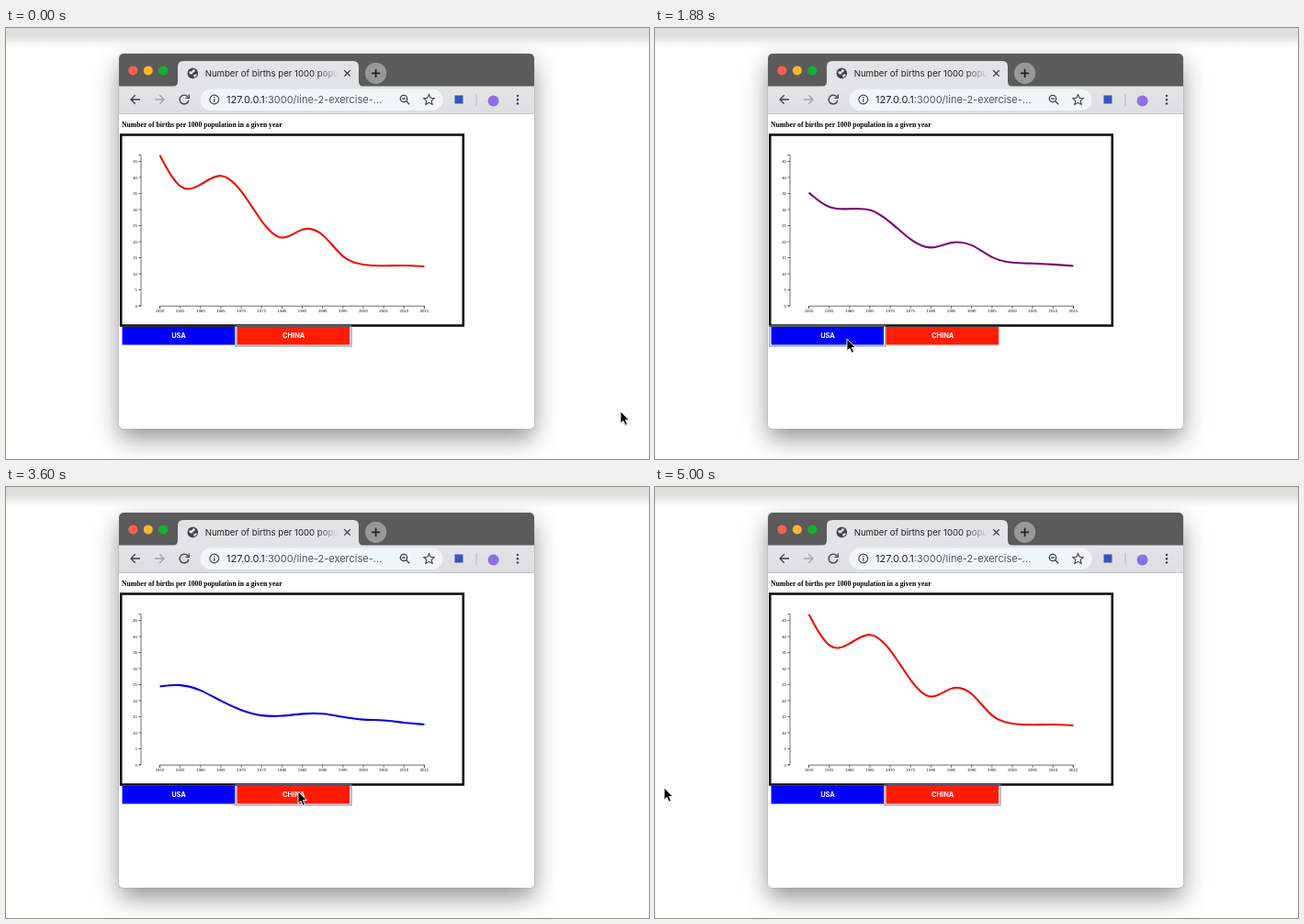
Animation, 700 px wide and 470 px high, one loop 5.04 s. Source, as an HTML page:

```html
<!DOCTYPE html>
<html lang="en">
<head>
<meta charset="utf-8">
<title>Births line chart</title>
<style>
  html, body { margin: 0; width: 100%; height: 100%; overflow: hidden; background: #fff; }
  #stage { position: relative; width: 700px; height: 470px; overflow: hidden;
    background: linear-gradient(#dcdcdc 0, #e0e0e0 9px, #f6f6f6 17px, #fff 23px) #fff; }
  #shadow { position: absolute; left: 123px; top: 28px; width: 452px; height: 409px; border-radius: 5px;
    box-shadow: 0 11px 27px rgba(0,0,0,.42), 0 0 1px rgba(0,0,0,.5); }
  svg { position: absolute; left: 0; top: 0; }
  text { white-space: pre; }
  .ui { font-family: Inter, Roboto, sans-serif; }
  .serif { font: bold 7.7px "Liberation Serif", "Times New Roman", serif; }
  .axis { font: 4.3px "Liberation Sans", Arial, sans-serif; fill: #111; }
  .axis path { fill: none; stroke: #333; stroke-width: .7; }
  .icon { fill: none; stroke: #3c4043; stroke-width: 1.3; }
  .label { font-size: 7.4px; font-weight: 700; fill: #fff; text-anchor: middle; }
</style>
</head>
<body>
<div id="stage">
  <div id="shadow"></div>
  <svg width="700" height="470" viewBox="0 0 700 470">
    <defs>
      <clipPath id="frame"><rect x="123" y="28" width="452" height="409" rx="5"/></clipPath>
      <linearGradient id="bar" x2="0" y2="1"><stop stop-color="#e3e4e5"/><stop offset="1" stop-color="#dddee0"/></linearGradient>
      <linearGradient id="fade"><stop stop-color="#e2e3e4" stop-opacity="0"/><stop offset="1" stop-color="#e2e3e4"/></linearGradient>
    </defs>

    <g clip-path="url(#frame)">
      <rect x="123" y="28" width="452" height="409" fill="#fff"/>
      <rect x="123" y="28" width="452" height="36" fill="#5b5b5b"/>
      <rect x="123" y="63.5" width="452" height="30" fill="url(#bar)"/>
      <rect x="123" y="93" width="452" height="1" fill="#c4c5c7"/>
    </g>

    <circle cx="138.3" cy="46.4" r="5" fill="#ff5f4e"/>
    <circle cx="154.8" cy="46.4" r="5" fill="#fdb62c"/>
    <circle cx="171.2" cy="46.4" r="5" fill="#12b233"/>

    <path d="M181 64Q187 64 187 58V42Q187 36 193 36H378Q384 36 384 42V58Q384 64 390 64Z" fill="#e2e3e4"/>
    <circle cx="203.3" cy="49.4" r="5.8" fill="#3f4347"/>
    <path d="M199 47.5l3.5-.2 1.2-2.4 2.2.8-.6 2.2-2.2 1.2.2 1.5-3.1-.3zM204 51.5l3.3-1.4.3 1.6-2.8 2.5z" fill="#e2e3e4"/>
    <text class="ui" x="216.7" y="53" font-size="9.6" fill="#222">Number of births per 1000 popu</text>
    <rect x="338" y="42" width="24" height="15" fill="url(#fade)"/>
    <path d="M368.3 46.2l6.4 6.4m0-6.4l-6.4 6.4" class="icon" stroke-width="1.5"/>
    <circle cx="402.6" cy="49.3" r="11.6" fill="#989898"/>
    <path d="M398 49.3h9.2m-4.6-4.6v9.2" fill="none" stroke="#222" stroke-width="1.7"/>

    <path d="M146 78h-10m4.7-4.7l-4.7 4.7 4.7 4.7" class="icon"/>
    <path d="M162 78h10m-4.7-4.7l4.7 4.7-4.7 4.7" class="icon" style="stroke:#a0a2a5"/>
    <path d="M198 75.2a4.9 4.9 0 1 0 .8 3.8M199.2 72.6v3.7h-3.8" class="icon"/>
    <rect x="211.5" y="66.5" width="264" height="23.5" rx="11.7" fill="#f0f6f6"/>
    <circle cx="226.8" cy="78" r="4.9" class="icon" style="stroke-width:1.1"/>
    <path d="M226.8 77.3v3.4m0-5.7v1.2" class="icon"/>
    <text class="ui" x="240" y="82" font-size="11" fill="#222">127.0.0.1<tspan fill="#55595d">:3000/line-2-exercise-...</tspan></text>
    <circle cx="433" cy="77" r="3.7" class="icon"/>
    <path d="M435.8 79.8l3.4 3.4M431.3 77h3.4" class="icon"/>
    <path d="M460.5 72.6l1.7 3.7 4 .4-3 2.7.9 4-3.6-2.1-3.6 2.1.9-4-3-2.7 4-.4z" class="icon" style="stroke-width:1.1"/>
    <rect x="488.5" y="73.5" width="9" height="9" fill="#3457b8"/>
    <rect x="511.5" y="72" width="1" height="13" fill="#b8babd"/>
    <circle cx="530.6" cy="79.5" r="6" fill="#8d70e3"/>
    <g fill="#3c4043"><circle cx="557" cy="74" r="1.2"/><circle cx="557" cy="78.2" r="1.2"/><circle cx="557" cy="82.4" r="1.2"/></g>

    <text class="serif" x="126" y="107.7">Number of births per 1000 population in a given year</text>
    <rect x="125.2" y="116.5" width="372.6" height="208" fill="none" stroke="#111" stroke-width="2.6"/>
    <g id="axes" class="axis"></g>
    <path id="line" fill="none" stroke-width="2.1"/>

    <rect x="126.5" y="326" width="122.5" height="19.5" fill="#0000ff"/>
    <rect x="251.5" y="326" width="122.7" height="19.5" fill="#ff1c00"/>
    <rect id="ring" y="324.8" width="126" height="22.2" fill="none" stroke="#6d83bd" stroke-width="1"/>
    <text class="ui label" x="188" y="337.7">USA</text>
    <text class="ui label" x="313.2" y="337.7">CHINA</text>

    <path id="cursor" d="M0 0V13.2L3 10.4 5.1 15.3 7.5 14.3 5.4 9.5H9.3Z" fill="#000" stroke="#fff" stroke-width=".9"/>
  </svg>
</div>
<script>
const LOOP = 5040, STEP = 40, FADE = 500;
const TO_USA = 1630, TO_CHINA = 3497, PRESS = 95;
const $ = id => document.getElementById(id);

const china = [46.9, 34.9, 37.4, 42.3, 36.5, 25.8, 19.2, 25, 23.3, 14.2, 12.6, 12.4, 12.7, 12.3];
const usa = [23.6, 24.9, 23, 19, 16.2, 14.7, 15, 15.7, 15.9, 14.9, 14, 14.1, 13.1, 12.6];
const red = [238, 14, 0], blue = [0, 0, 232];

// time, x, y of the pointer
const track = [
  [0, 669, 418], [560, 335, 398], [760, 315, 398], [1120, 258, 367], [1560, 209, 342],
  [1880, 209, 339], [2240, 209, 340], [2860, 318, 322], [3280, 318, 332],
  [4060, 318, 332], [4480, 190, 376], [5000, 10, 328]
];

const px = i => 167.5 + i * 22.15;
const py = v => 303 - v * 3.5;
const mix = (a, b, k) => a.map((v, i) => v + (b[i] - v) * k);
const clamp = v => Math.min(1, Math.max(0, v));
const cubic = t => t < .5 ? 4 * t ** 3 : 1 - 4 * (1 - t) ** 3;

function drawAxes() {
  let d = 'M144.3 138.5H147V303H144.3M167.5 306V303.2H455.4V306', labels = '';
  for (let v = 0; v <= 45; v += 5) {
    d += `M144.3 ${py(v)}H147`;
    labels += `<text x="143" y="${py(v) + 1.5}" text-anchor="end">${v}</text>`;
  }
  for (let i = 0; i < 14; i++) {
    d += `M${px(i)} 303.2V306`;
    labels += `<text x="${px(i)}" y="309.6" text-anchor="middle">${1950 + i * 5}</text>`;
  }
  $('axes').innerHTML = `<path d="${d}"/>${labels}`;
}

// Uniform cubic B-spline with straight ends
function basis(values) {
  const p = values.map((v, i) => [px(i), py(v)]), n = p.length;
  let d = `M${p[0]}L${mix(p[0], p[1], 1 / 6)}`;
  for (let i = 1; i <= n; i++) {
    const a = p[i - 1], b = p[Math.min(i, n - 1)], c = p[Math.min(i + 1, n - 1)];
    if (i === n) break;
    const end = mix(mix(a, b, 2 / 3), mix(b, c, 1 / 3), .5);
    d += `C${mix(a, b, 1 / 3)} ${mix(a, b, 2 / 3)} ${end}`;
  }
  return d + `L${p[n - 1]}`;
}

// Monotone Hermite interpolation along the track
function pointer(t) {
  let i = 0;
  while (i < track.length - 2 && t >= track[i + 1][0]) i++;
  const a = track[i], b = track[i + 1], span = b[0] - a[0], s = clamp((t - a[0]) / span);
  return [1, 2].map(c => {
    const slope = k => track[k] && track[k + 1]
      ? (track[k + 1][c] - track[k][c]) / (track[k + 1][0] - track[k][0]) : 0;
    const tangent = k => {
      const l = slope(k - 1), r = slope(k);
      return l * r > 0 ? 2 * l * r / (l + r) : 0;
    };
    const u = 1 - s;
    return a[c] * u * u * (1 + 2 * s) + b[c] * s * s * (3 - 2 * s)
      + span * s * u * (tangent(i) * u - tangent(i + 1) * s);
  });
}

function draw() {
  const t = Math.floor(performance.now() % LOOP / STEP) * STEP;
  const k = cubic(clamp((t - TO_USA) / FADE)) - cubic(clamp((t - TO_CHINA) / FADE));
  $('line').setAttribute('d', basis(mix(china, usa, k)));
  $('line').setAttribute('stroke', `rgb(${mix(red, blue, k).map(Math.round)})`);
  const onUsa = t >= TO_USA - PRESS && t < TO_CHINA - PRESS;
  $('ring').setAttribute('x', onUsa ? 124.8 : 250);
  $('cursor').setAttribute('transform', `translate(${pointer(t)})`);
  requestAnimationFrame(draw);
}

drawAxes();
draw();
</script>
</body>
</html>
```
